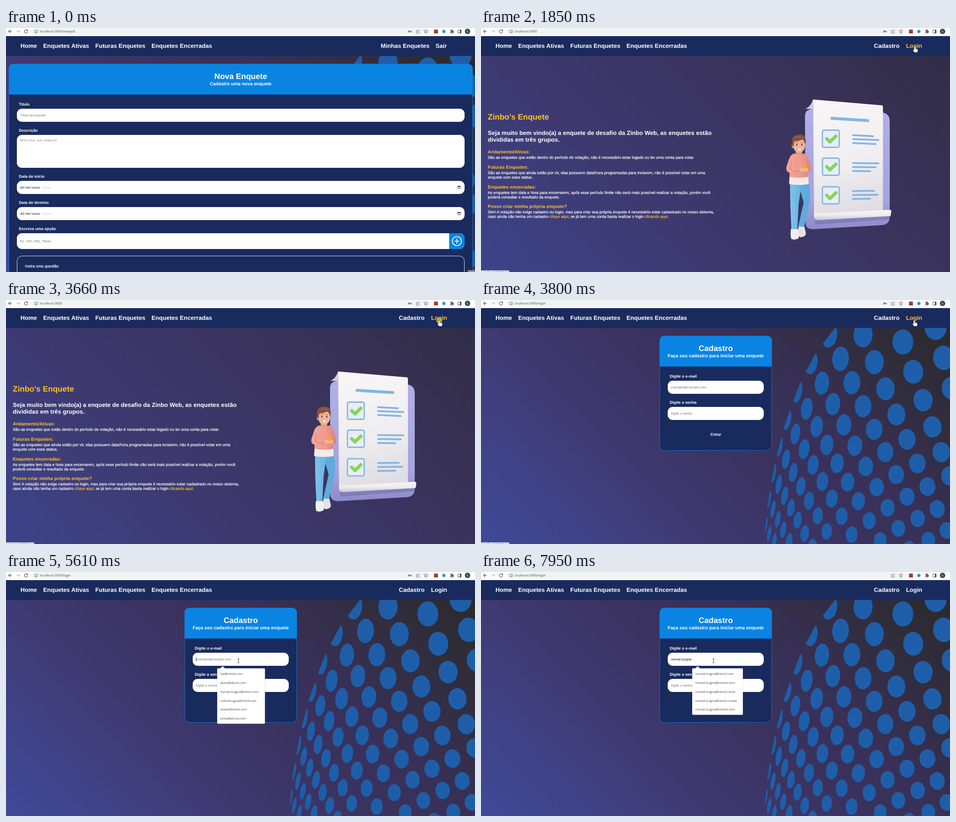
Write an HTML page with a canvas that moves like this. It is 1035 px wide and 541 px high and loops after 8000 ms.

```html
<!DOCTYPE html>
<html lang="pt-BR">
<head>
<meta charset="utf-8">
<title>Enquetes</title>
<style>
  html, body { margin: 0; width: 100%; height: 100%; overflow: hidden; background: #192a5c; }
  canvas { display: block; width: 1035px; height: 541px; }
</style>
</head>
<body>
<canvas id="stage"></canvas>
<script>
const W = 1035, H = 541, LOOP = 8000;
const canvas = document.getElementById('stage');
const ctx = canvas.getContext('2d');
const dpr = window.devicePixelRatio || 1;
canvas.width = W * dpr;
canvas.height = H * dpr;

const SANS = '"Liberation Sans", Arial, sans-serif';
const UI = '"Open Sans", "Noto Sans", sans-serif';
const MONO = '"Liberation Mono", monospace';
const NAVY = '#192a5d', BLUE = '#0984e3', YELLOW = '#fdc22b', DOT = '#1e5ea9', GRAY = '#757575';
const H1 = 17.45, H2 = 13.09, H3 = 10.21, BODY = 8.73, FIELD = 7.27;

// ---------- drawing helpers ----------
function text(s, x, y, size, color = '#fff', bold = false, align = 'left', font = SANS) {
  ctx.font = `${bold ? 'bold ' : ''}${size}px ${font}`;
  ctx.textAlign = align;
  ctx.fillStyle = color;
  ctx.fillText(s, x, y);
  // a hairline outline gives small regular text its screen weight
  if (!bold && size === BODY) {
    ctx.strokeStyle = color;
    ctx.lineWidth = .22;
    ctx.strokeText(s, x, y);
  }
  return ctx.measureText(s).width;
}
function rect(x, y, w, h, color) {
  ctx.fillStyle = color;
  ctx.fillRect(x, y, w, h);
}
function box(x, y, w, h, r, fill, stroke, lw = 1) {
  ctx.beginPath();
  ctx.roundRect(x, y, w, h, r);
  if (fill) { ctx.fillStyle = fill; ctx.fill(); }
  if (stroke) { ctx.strokeStyle = stroke; ctx.lineWidth = lw; ctx.stroke(); }
}
function ellipse(x, y, rx, ry, color, rot = 0) {
  ctx.beginPath();
  ctx.ellipse(x, y, rx, ry, rot, 0, Math.PI * 2);
  ctx.fillStyle = color;
  ctx.fill();
}
function fill(d, color) {
  ctx.fillStyle = color;
  ctx.fill(new Path2D(d));
}
function stroke(d, color, lw, cap = 'butt') {
  ctx.strokeStyle = color;
  ctx.lineWidth = lw;
  ctx.lineCap = cap;
  ctx.lineJoin = cap === 'butt' ? 'miter' : 'round';
  ctx.stroke(new Path2D(d));
}
function gradient(x0, y0, x1, y1, stops) {
  const g = ctx.createLinearGradient(x0, y0, x1, y1);
  stops.forEach(([at, color]) => g.addColorStop(at, color));
  return g;
}
function backdrop(stops) {
  rect(0, 62, W, H - 62, gradient(139, 680, 896, -77, stops));
}

// ---------- dotted background ----------
// Each strand: dot count, then first, middle and last centre.
const STRANDS = [
  [4, 1003, 60, 1030, 162, 1057, 262],
  [6, 931, 93, 986, 252, 1034, 390],
  [9, 843, 77, 940, 309, 1028, 511],
  [10, 768, 77, 880, 312, 987, 532],
  [10, 728, 138, 837, 346, 945, 552],
  [9, 697, 202, 786, 362, 881, 533],
  [8, 675, 264, 743, 384, 818, 520],
  [7, 658, 325, 706, 413, 763, 513],
  [7, 645, 384, 684, 461, 731, 547],
  [5, 635, 443, 655, 486, 680, 535],
  [3, 628, 502, 636, 518, 647, 535]
];
const EDGE = 'M790 50L739 117L716 160L705 182L688 226L667 287L652 347L640 405L631 463L626 522L624 541H1035V62H790Z';
const quad = (a, b, c, u) => 2 * (u - .5) * (u - 1) * a + 4 * u * (1 - u) * b + 2 * u * (u - .5) * c;

function dottedPage() {
  backdrop([[0, '#3f4a99'], [.32, '#403a72'], [.5, '#3b3361'], [.66, '#393058'], [.82, '#322e42'], [1, '#2b2a2b']]);
  ctx.save();
  ctx.clip(new Path2D(EDGE));
  for (const [n, x0, y0, xm, ym, x1, y1] of STRANDS) {
    for (let i = 0; i < n; i++) {
      const u = i / (n - 1), x = quad(x0, xm, x1, u), y = quad(y0, ym, y1, u);
      const ry = 30 - y * .0225;
      const rx = ry * .9 * (1 - Math.exp((600 - x) / 136));
      ellipse(x, y, rx, ry, DOT, (900 - x) * .0007);
    }
  }
  ctx.restore();
}

// ---------- browser bar and menu ----------
function browserBar(path, showKey) {
  const ink = '#5f6368';
  rect(0, 0, W, 18, '#fff');
  box(56, .5, 882, 14.5, 7, '#f1f3f4');
  stroke('M13 7.5H6M9.3 4L5.8 7.5L9.3 11', '#4a4d51', 1.1);
  stroke('M23 7.5H30M26.7 4L30.2 7.5L26.7 11', '#b9bcc0', 1.1);
  stroke('M47.3 5.6A3.7 3.7 0 1 0 47.8 8.6', '#4a4d51', 1.1);
  fill('M48.3 3.4V6.9H44.8Z', '#4a4d51');
  stroke('M70 7.8A3.4 3.4 0 1 1 63.2 7.8A3.4 3.4 0 1 1 70 7.8M66.6 7.3V9.8M66.6 5.6V6.5', ink, .9);
  text('localhost:3000' + path, 75, 10.3, 7.23, '#4b4f54', false, 'left', UI);
  if (showKey) {
    stroke('M891.2 7.5A1.5 1.5 0 1 1 888.2 7.5A1.5 1.5 0 1 1 891.2 7.5M891 7.5H895.6M894.3 7.5V9.5', ink, 1.4);
  }
  stroke('M907.5 5H905.8V11.2H912V9M908 8.6Q908.4 5.7 911.6 5.6M910.2 3.6L912.4 5.6L910.2 7.6', ink, .9);
  stroke('M926.6 3.4L927.7 6.3L930.7 6.5L928.4 8.4L929.2 11.4L926.6 9.7L924 11.4L924.8 8.4L922.5 6.5L925.5 6.3Z', ink, .9);
  rect(944.5, 3.5, 8.5, 8.5, '#a8382f');
  ellipse(966.2, 7.6, 3.6, 3.6, '#2f8fe6');
  fill('M980 5H982.3A1.5 1.5 0 1 1 985.2 5H987V7.2A1.4 1.4 0 1 1 987 9.9V12H984.8A1.3 1.3 0 1 0 982.3 12H980V9.6A1.4 1.4 0 1 0 980 7Z', ink);
  box(997.3, 4.3, 7, 7, .5, null, '#4a4d51', 1);
  rect(1001.5, 4, 3.2, 7.6, '#4a4d51');
  ellipse(1018.5, 7.5, 6, 6, '#3b475a');
  text('N', 1018.5, 9.7, 6, '#dfe6ee', false, 'center', UI);
}
function navBar(first, firstX, last, lastX, hover) {
  rect(0, 18, W, 44, NAVY);
  const items = [['Home', 32], ['Enquetes Ativas', 82], ['Futuras Enquetes', 197], ['Enquetes Encerradas', 321], [first, firstX]];
  items.forEach(([label, x]) => text(label, x, 44, H2, '#fff', true));
  text(last, lastX, 44, H2, hover ? YELLOW : '#fff', true);
}
function statusBar(url) {
  box(-3, 537.5, 65.5, 8, 2, '#e3e5e8');
  text(url, 2, 544, 6.6, '#5b5f63', false, 'left', UI);
}

// ---------- forms ----------
function card(x, w, bottom, title, sub) {
  box(x + .5, 80, w - 1, bottom - 80, 10, NAVY, BLUE, .8);
  box(x, 79.5, w, 68, [10, 10, 0, 0], BLUE);
  text(title, 518, 113, H1, '#fff', true, 'center');
  text(sub, 518, 126.5, H3, '#fff', true, 'center');
}
const label = (s, x, y) => text(s, x, y, BODY, '#fff', true);
const field = (x, y, w, h) => box(x, y, w, h, 11, '#fff');

function dateField(y) {
  field(24, y, 988, 29);
  text('dd/mm/aaaa --:--', 31, y + 17.2, FIELD, '#222', false, 'left', MONO);
  box(997.2, y + 11.8, 5.4, 5.4, .5, null, '#222', .9);
  rect(996.8, y + 11.2, 6.2, 2, '#222');
}
function newPollPage() {
  dottedPage();
  card(6, 1024, 700, 'Nova Enquete', 'Cadastre uma nova enquete');
  label('Titulo', 28.5, 172.3);
  field(24, 179, 988, 29);
  text('Título da enquete', 31, 196.3, FIELD, GRAY);
  label('Descrição', 28.5, 230.3);
  field(24, 237, 988, 73);
  text('Descreva sua enquete', 31, 250.8, 6.75, GRAY, false, 'left', MONO);
  stroke('M1006 308L1010 304M1008.4 308.2L1010.2 306.4', '#999', .5);
  label('Data de início', 28.5, 332.3);
  dateField(339);
  label('Data de término', 28.5, 390.3);
  dateField(397);
  label('Escreva uma opção', 28.5, 448.3);
  field(24, 455, 988, 35);
  text('Ex.: Sim, Não, Talvez', 31, 474.8, FIELD, GRAY);
  box(978, 455, 34, 35, [0, 11, 11, 0], BLUE);
  stroke('M1005 472.5A10 10 0 1 1 985 472.5A10 10 0 1 1 1005 472.5M995 467V478M989.5 472.5H1000.5', '#fff', 1.7);
  box(24.5, 505.5, 987, 80, 11, null, '#dfe3ee', 1);
  text('Insira uma questão', 42, 530.6, BODY);
}

// ---------- home ----------
const SECTIONS = [
  [278, 'Andamento/Ativas:', ['São as enquetes que estão dentro do período de votação, não é necessário estar logado ou ter uma conta para votar.']],
  [311.5, 'Futuras Enquetes:', ['São as enquetes que ainda estão por vir, elas possuem data/hora programadas para inciarem, não é possível votar em uma', 'enquete com esse status.']],
  [355.5, 'Enquetes encerradas:', ['As enquetes tem data e hora para encerrarem, após esse período limite não será mais possível realizar a votação, porém você', 'poderá consultar o resultado da enquete.']],
  [399, 'Posso criar minha própria enquete?', ['Sim! A votação não exige cadastro ou login, mas para criar sua própria enquete é necessário estar cadastrado no nosso sistema,', 'caso ainda não tenha um cadastro |clique aqui|, se já tem uma conta basta realizar o login |clicando aqui.']]
];
function homePage() {
  backdrop([[0, '#3c4389'], [.32, '#3e3a71'], [.6, '#3b3461'], [.85, '#363050'], [1, '#312e46']]);
  text("Zinbo's Enquete", 15, 203.3, H1, YELLOW, true);
  text('Seja muito bem vindo(a) a enquete de desafio da Zinbo Web, as enquetes estão', 15, 237, H2, '#fff', true);
  text('divididas em três grupos.', 15, 252, H2, '#fff', true);
  for (const [y, head, lines] of SECTIONS) {
    text(head, 15, y, H3, YELLOW, true);
    lines.forEach((line, i) => {
      let x = 15;
      line.split('|').forEach((part, k) => {
        x += text(part, x, y + 12.3 + i * 10, BODY, k % 2 ? YELLOW : '#fff');
      });
    });
  }
  clipboard();
  boy();
}
function clipboard() {
  const ice = '#84b6e2';
  fill('M715 196Q715 180 731 180L884 187Q902 189 902 207V418Q902 435 886 437L735 446Q716 447 716 431Z',
    gradient(0, 180, 0, 446, [[0, '#b0afe7'], [.75, '#a5a4dd'], [1, '#8d8bca']]));
  fill('M736 418L903 410V424L738 436Z', 'rgba(70,66,130,.25)');
  fill('M733 158.5L885 171.5Q887 172 887 175V406L735 420Z',
    gradient(740, 160, 800, 415, [[0, '#f8f6f6'], [.6, '#f0edf0'], [1, '#dfdce3']]));
  fill('M733 158.5Q727 175 716 179L734 180Z', '#cfcbd8');
  fill('M735 407Q738 412 745 411L902 403Q907 403 905 410L904 417L744 426Q735 426 735 418Z',
    gradient(0, 403, 0, 426, [[0, '#f8f6f7'], [.5, '#efecee'], [1, '#cac5ce']]));
  stroke('M774.5 200.3L853.5 205.3', ice, 6.5, 'round');
  for (const y of [226.5, 288.5, 352]) {
    box(753.5, y, 37, 38, 3, '#e9edf4', ice, 2.8);
    stroke(`M763 ${y + 19}L770 ${y + 26}L783 ${y + 13.5}`, '#87d360', 7.4, 'round');
  }
  const rows = [[237.5, 2.4, 48, 60, 54], [299.5, .6, 60, 54, 42], [361.5, -.5, 50, 58, 42]];
  for (const [y, slope, ...widths] of rows) {
    widths.forEach((w, i) => stroke(`M821 ${y + i * 8.7}L${817 + w} ${y + i * 8.7 + slope}`, ice, 4, 'round'));
  }
}
function boy() {
  const skin = '#efb598', wool = '#ee988c', hair = '#85503f';
  // legs and shoes
  fill('M701 440L713 438L717 455Q717 463 705 464L698 459Z', '#e6e1e7');
  fill('M684 445H699Q703 456 701 466Q694 471 685 468Q682 461 684 445Z', '#f2eef0');
  fill('M700 345H724Q728 366 726 385L713 441L700 440L712 387Z', '#5fabdb');
  fill('M682 344H708Q704 368 701 390L698 446H685Q682 396 682 344Z', gradient(682, 0, 706, 0, [[0, '#7fc3ec'], [1, '#68b3e1']]));
  // body
  fill('M695 270H708L709 281Q702 286 694 281Z', '#dc9c7d');
  fill('M681 326H722L723 346Q702 350 680 346Z', '#f3ebe8');
  fill('M691 278Q702 284 712 278Q721 280 725 295L729 312Q729 320 722 320L722 330Q702 334 681 330L681 321Q672 319 674 308L680 290Q683 281 691 278Z',
    gradient(674, 0, 729, 0, [[0, '#f3a699'], [.6, wool], [1, '#dc837a']]));
  stroke('M684 296L683 312Q690 321 705 316M720 298L721 312', '#da857c', 1.4, 'round');
  ellipse(708, 313.5, 6, 4.5, skin);
  ellipse(717, 314, 5, 4.5, skin);
  box(710.5, 300, 8, 12, 2, '#f0a72e');
  // head
  ellipse(688.5, 262, 2.8, 4, '#e0a284');
  ellipse(702, 260, 13.2, 16.5, skin);
  fill('M688 263Q684 252 687 245Q690 237 699 237Q706 234 712 239Q719 244 716 259Q714 251 709 247Q701 252 692 251Q690 256 690 262Z', hair);
  stroke('M692 244Q700 239 710 243', '#9a6350', 1.8, 'round');
  ellipse(697, 259, 1.3, 2, '#3b2a2a');
  ellipse(708, 259, 1.3, 2, '#3b2a2a');
  stroke('M694.5 254.7Q697 253.5 699 254.5M706 254.5Q708 253.5 710.5 254.7', hair, .9, 'round');
  fill('M698 267Q702.5 268.5 707 267Q705 271.5 702 271Z', '#fff');
}

// ---------- login ----------
const USER = 'norival.tcugna';
const RECENT = ['bia@nimol.com', 'aluno@aluno.com', USER + '@nimol.com', 'nrdvstlcugna@nimol.com', 'otavio@nimol.com', 'prova@prova.com'];
const MATCHES = ['nimol.com', 'nimsol.com', 'nimol.coma', 'nimol.comaa', 'nsimol.com'].map(d => USER + '@' + d);

function typedCount(t) {
  if (t < 5750) return 0;
  if (t < 6550) return Math.min(7, 1 + Math.floor((t - 5750) / 88));
  if (t < 6820) return 8;
  if (t < 7420) return Math.min(13, 9 + Math.floor((t - 6820) / 85));
  return 14;
}
function caretOn(t) {
  if (t < 4540) return false;
  const from = t < 5750 ? 4545 : t < 7420 ? t : 7420;
  return Math.floor((t - from) / 530) % 2 === 0;
}
function suggestions(list, right) {
  const h = list.length * 19.7 + 4.8;
  box(466, 213.5, right - 466, h, 2, '#fff', 'rgba(0,0,0,.18)', .6);
  fill('M472.5 214L478 208.8L483.5 214Z', '#fff');
  list.forEach((s, i) => text(s, 473, 228.4 + i * 19.7, 6.75, '#3a3d42', false, 'left', UI));
}
function loginPage(t) {
  dottedPage();
  card(394, 248, 333.5, 'Cadastro', 'Faça seu cadastro para iniciar uma enquete');
  label('Digite o e-mail', 416.5, 172.3);
  field(412, 179, 212, 29);
  label('Digite a senha', 416.5, 230.3);
  field(412, 237, 212, 29);
  text('Digite a senha', 419, 254.3, FIELD, GRAY);
  text('Entrar', 518, 301, BODY, '#fff', false, 'center');
  const n = typedCount(t);
  const typed = USER.slice(0, n);
  const w = text(typed || 'exemplo@exemplo.com', 419, 196.3, FIELD, n ? '#111' : GRAY);
  if (caretOn(t)) rect(419 + (n ? w : 0), 189, .8, 9, '#111');
  if (t >= 4610) {
    if (!n) suggestions(RECENT, 571.5);
    else if (n < 8) suggestions(['norival@nimol.com', ...MATCHES], 578);
    else suggestions(MATCHES, 578);
  }
}

// ---------- pointer ----------
const TRACK = [
  [70, 1030, 538], [470, 873, 138], [620, 881, 84], [890, 951, 46], [1310, 957, 41],
  [2050, 957, 41], [2610, 906, 150], [2750, 906, 150], [3520, 956, 45], [3880, 956, 45], [4500, 513, 197]
];
function pointerAt(t) {
  let i = TRACK.findIndex(k => k[0] > t);
  if (i < 0) return TRACK[TRACK.length - 1].slice(1);
  if (i === 0) i = 1;
  const [t0, x0, y0] = TRACK[i - 1], [t1, x1, y1] = TRACK[i];
  const u = Math.max(0, (t - t0) / (t1 - t0)), e = u * u * (3 - 2 * u);
  return [x0 + (x1 - x0) * e, y0 + (y1 - y0) * e];
}
const HAND = 'M-1.3 .3Q0 -.9 1.3 .3V4.5Q3 4 3.4 5Q5 4.6 5.3 5.8Q6.8 5.6 6.8 7V9.5Q6.5 11.5 5.5 13H-.5Q-2 10.5 -3.8 8.2Q-3.3 6.6 -1.3 8.2Z';
const ARROW = 'M0 0V10L2.3 7.9L3.9 11.4L5.4 10.7L3.8 7.4H6.8Z';
const BEAM = 'M-2 -4.5Q0 -4.5 0 -3.5Q0 -4.5 2 -4.5M0 -3.5V3.5M-2 4.5Q0 4.5 0 3.5Q0 4.5 2 4.5';

function pointer(x, y, kind, pressed) {
  ctx.save();
  ctx.translate(x, y);
  if (pressed) ellipse(0, 1, 6.3, 6.3, 'rgba(222,204,10,.8)');
  if (kind === 'beam') {
    stroke(BEAM, '#222', .9);
  } else {
    const shape = kind === 'hand' ? HAND : ARROW;
    stroke(shape, '#111', 1.2, 'round');
    fill(shape, '#fff');
    if (kind === 'hand') stroke('M1.4 4.6V7M3.5 5.2V7.2M5.3 6V7.6', '#333', .5);
  }
  ctx.restore();
}

// ---------- scene ----------
function draw(t) {
  ctx.setTransform(dpr, 0, 0, dpr, 0, 0);
  ctx.textRendering = 'geometricPrecision';
  const [x, y] = pointerAt(t);
  const inPoll = t < 1850, inHome = !inPoll && t < 3800;
  const hover = t >= 70 && y > 30 && y < 51 && x > (inPoll ? 947 : 937) && x < 974;

  if (inPoll) newPollPage();
  else if (inHome) homePage();
  else loginPage(t);

  browserBar(inPoll ? '/newpoll' : inHome ? '' : '/login', t < 5750);
  if (inPoll) navBar('Minhas Enquetes', 827, 'Sair', 948, hover);
  else navBar('Cadastro', 867, 'Login', 938, hover);

  if (hover) statusBar(inPoll ? 'localhost:3000/sair' : 'localhost:3000/login');
  if (t < 70) {
    rect(1019, 537, 16, 4, '#8d9097');
  } else {
    const inField = !inPoll && !inHome && x < 624 && y > 179 && y < 208;
    const pressed = (t >= 1710 && t < 1850) || (t >= 3590 && t < 3800) || (t >= 4500 && t < 4680);
    pointer(x, y, hover ? 'hand' : inField ? 'beam' : 'arrow', pressed);
  }
}

const start = performance.now();
function tick() {
  draw((performance.now() - start) % LOOP);
  requestAnimationFrame(tick);
}
tick();
</script>
</body>
</html>
```
